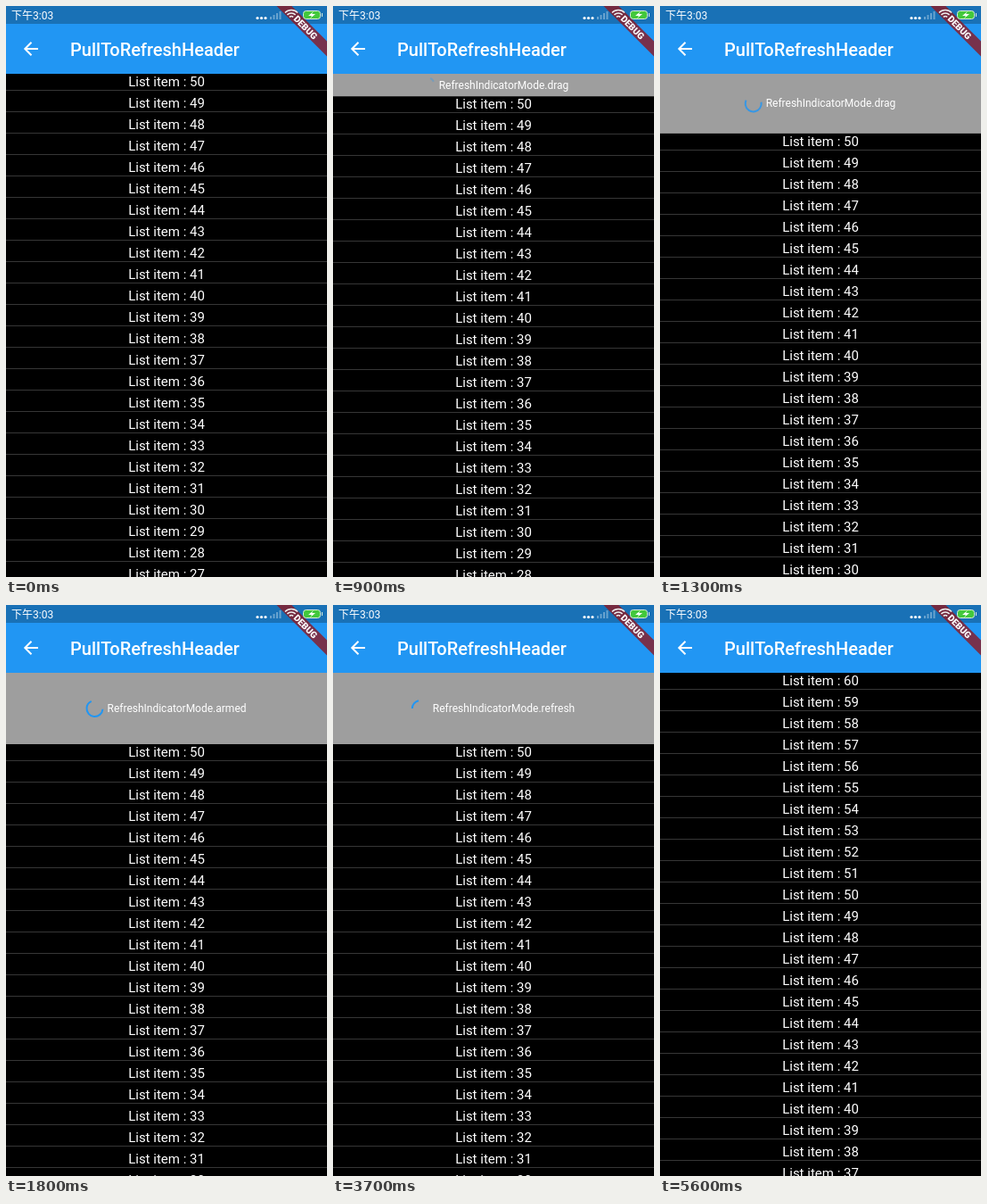
Animation of 360 by 640 pixels, one loop 5700 ms. Source, as an HTML page with a canvas:

```html
<!DOCTYPE html>
<html lang="en">
<head>
<meta charset="utf-8">
<title>Pull to refresh</title>
<style>
  html, body { margin: 0; width: 100%; height: 100%; overflow: hidden; background: #000; }
  canvas { display: block; width: 360px; height: 640px; }
</style>
</head>
<body>
<canvas id="stage" width="360" height="640"></canvas>
<script>
const ctx = document.getElementById('stage').getContext('2d');
const LOOP = 5700, STEP = 100, TOP = 76, ROW = 24, FULL = 80;
const REFRESH = 1973, DONE = 4000, CLOSE_TIME = 400;
const FONT = 'Roboto, "Noto Sans CJK SC", "Noto Sans CJK", sans-serif';

const clamp = (v, lo, hi) => Math.min(hi, Math.max(lo, v));

// Steady drag down, hold, then linear pull back
function pullHeight(t) {
  if (t <= DONE) return clamp((t - 657) * 0.104, 0, FULL);
  return FULL * clamp(1 - (t - DONE - 3) / CLOSE_TIME, 0, 1);
}

function modeAt(t, h) {
  if (h === 0 || t >= DONE) return '';
  return t >= REFRESH ? 'refresh' : h < FULL ? 'drag' : 'armed';
}

// Cubic Bezier (0.4, 0, 0.2, 1)
function ease(x) {
  if (x <= 0 || x >= 1) return clamp(x, 0, 1);
  let lo = 0, hi = 1;
  for (let i = 0; i < 20; i++) {
    const m = (lo + hi) / 2, n = 1 - m;
    if (1.2 * n * n * m + 0.6 * n * m * m + m * m * m < x) lo = m; else hi = m;
  }
  return lo * lo * (3 - 2 * lo);
}

function rect(color, x, y, w, h) {
  ctx.fillStyle = color;
  ctx.fillRect(x, y, w, h);
}

function text(str, x, y, size, weight = 400, align = 'left') {
  ctx.font = `${weight} ${size}px ${FONT}`;
  ctx.textAlign = align;
  ctx.fillStyle = '#fff';
  ctx.fillText(str, x, y);
}

function stroke(color, width, build) {
  ctx.strokeStyle = color;
  ctx.lineWidth = width;
  ctx.beginPath();
  build();
  ctx.stroke();
}

function spinner(x, y, r, turns) {
  const cycle = Math.floor(turns), p = turns - cycle;
  const head = ease(p * 2), tail = ease(p * 2 - 1);
  const start = Math.PI * (-0.5 + 1.5 * tail + 1.7 * p - 0.8 * cycle);
  const sweep = Math.max(1.5 * Math.PI * (head - tail), 0.01);
  stroke('#2196f3', 2, () => ctx.arc(x, y, r, start, start + sweep));
}

function list(h, first) {
  for (let i = 0; i < 24; i++) {
    const y = TOP + h + i * ROW;
    text(`List item : ${first - i}`, 180, y + 14, 15, 400, 'center');
    rect('#363636', 0, Math.round(y + 18), 360, 1);
  }
}

function header(h, mode, t) {
  if (!mode) return;
  const label = 'RefreshIndicatorMode.' + mode;
  ctx.font = `400 12px ${FONT}`;
  const size = clamp(h - 5, 0, 18);
  const left = 180 - (ctx.measureText(label).width + size + 5) / 2;
  const mid = TOP + Math.max(h / 2, 7);
  const pulled = h / FULL;
  const turns = mode === 'refresh' ? (t - REFRESH) / 1000 : pulled * 0.31;
  ctx.globalAlpha = pulled;
  spinner(left + size / 2, mid, size / 2, turns);
  ctx.globalAlpha = 1;
  text(label, left + size + 5, mid + 4, 12);
}

function statusIcons() {
  ctx.fillStyle = '#fff';
  for (let i = 0; i < 3; i++) {
    ctx.beginPath();
    ctx.arc(282 + i * 4.5, 13.5, 1.6, 0, 7);
    ctx.fill();
  }
  for (let i = 0; i < 4; i++) rect('#69a3cf', 296 + i * 3.5, 12 - i * 2, 2, 3 + i * 2);
  ctx.fillStyle = '#43c83c';
  ctx.beginPath();
  ctx.roundRect(333.5, 5.5, 19, 9, 3);
  ctx.fill();
  stroke('#d9eedb', 1, () => ctx.roundRect(333.5, 5.5, 19, 9, 3));
  rect('#d9eedb', 354, 8, 1, 4);
  ctx.fillStyle = '#fff';
  ctx.beginPath();
  [[345, 6], [339, 11], [343, 11], [341, 14], [347, 9], [343, 9]].forEach(p => ctx.lineTo(...p));
  ctx.fill();
}

function wifi() {
  for (const r of [3, 6.5, 10])
    stroke('#eee', 1.5, () => ctx.arc(320, 14.5, r, -Math.PI * 0.75, -Math.PI * 0.25));
}

function banner() {
  ctx.save();
  ctx.translate(360, 0);
  ctx.rotate(Math.PI / 4);
  rect('rgba(140, 24, 36, 0.8)', -40, 28, 80, 12);
  text('DEBUG', 0, 37.6, 10.2, 900, 'center');
  ctx.restore();
}

function appBar() {
  rect('#2196f3', 0, 0, 360, TOP);
  rect('#1971b6', 0, 0, 360, 20);
  text('下午3:03', 6, 15, 12);
  stroke('#fff', 2, () => {
    ctx.moveTo(36, 48);
    ctx.lineTo(22, 48);
    ctx.moveTo(28.5, 40.7);
    ctx.lineTo(21.3, 48);
    ctx.lineTo(28.5, 55.3);
  });
  text('PullToRefreshHeader', 72, 56, 20, 500);
  banner();
  statusIcons();
  wifi();
}

function draw(now) {
  const t = Math.floor(now % LOOP / STEP) * STEP;
  const h = pullHeight(t);
  rect('#000', 0, 0, 360, 640);
  rect('#9e9e9e', 0, TOP, 360, h);
  list(h, t < DONE ? 50 : 60);
  header(h, modeAt(t, h), t);
  appBar();
}

const begin = performance.now();
function tick() {
  draw(performance.now() - begin);
  requestAnimationFrame(tick);
}
tick();
</script>
</body>
</html>
```
